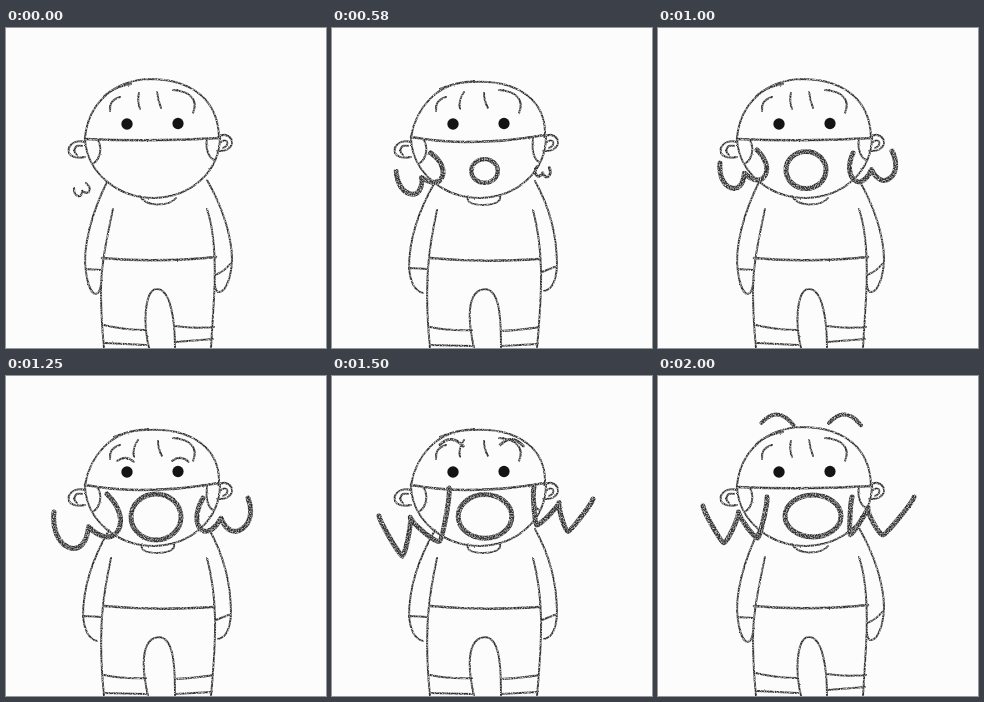
Recreate the animation shown at these times as an HTML page. Size 320 px wide and 320 px high, loop 10000 ms.

```html
<!DOCTYPE html>
<html lang="en">
<head>
<meta charset="utf-8">
<title>Wow</title>
<style>
html, body { margin: 0; width: 100%; height: 100%; overflow: hidden; background: #fcfcfc; }
svg { display: block; width: 100vw; height: 100vh; }
path, ellipse { fill: none; stroke: #303030; stroke-width: 2; stroke-linecap: round; stroke-linejoin: round; }
.bold { stroke-width: 2.5; }
.eye { fill: #141414; stroke: none; }
</style>
</head>
<body>
<svg viewBox="0 0 320 320">
  <defs>
    <filter id="pencil" filterUnits="userSpaceOnUse" x="0" y="0" width="320" height="320" color-interpolation-filters="sRGB">
      <feTurbulence type="fractalNoise" baseFrequency=".8" numOctaves="2" seed="4" result="noise"/>
      <feDisplacementMap in="SourceGraphic" in2="noise" scale="1.6" xChannelSelector="R" yChannelSelector="G" result="rough"/>
      <feColorMatrix in="noise" values="0 0 0 0 0  0 0 0 0 0  0 0 0 0 0  0 0 1.9 0 -.18" result="grain"/>
      <feComposite in="rough" in2="grain" operator="in"/>
    </filter>
  </defs>
  <g filter="url(#pencil)">
    <!-- parts common to both drawings -->
    <path d="M79 111C81 146 113 170 148 170C186 169 214 143 214 108"/>
    <path d="M79 114C68 111 61 118 63 125Q66 131 79 129M76 118C69 116 66 123 71 127"/>
    <path d="M212 109C219 104 227 109 226 116Q223 124 211 123M215 114C221 109 225 117 217 120"/>
    <path d="M91 111C97 119 94 131 88 135M104 83Q103 72 114 69M167 62C183 63 193 71 187 85"/>
    <g id="poseA">
      <path d="M79 110C82 76 108 51 146 51C186 52 212 72 213 109M98 68Q108 59 125 56"/>
      <path d="M201 111C199 121 203 131 209 132M133 65Q131 73 134 81M151 64Q152 72 155 80"/>
      <path d="M134 168C140 180 164 178 170 170"/>
      <path d="M101 154C86 184 76 220 80 244C82 258 86 266 90 266Q94 265 95 256M80 241L95 242"/>
      <path d="M201 152C216 178 226 208 226 232C225 254 218 265 212 264Q209 262 209 256M209 247Q219 243 224 236"/>
      <path d="M107 181C102 205 95 235 95 262Q95 290 98 320M201 181C209 205 210 235 208 270L205 320"/>
      <path d="M143 320C136 290 140 261 151 261C164 261 169 290 169 320"/>
      <path d="M98 297Q118 302 140 302M99 315L140 317M169 298Q188 301 208 299M169 314L207 311"/>
      <path class="bold" d="M79 111Q146 114 214 110M96 230Q150 235 210 229"/>
    </g>
    <g id="poseB">
      <path d="M79 109C84 80 105 54 140 54C190 51 214 76 213 107M108 61Q124 54 142 53"/>
      <path d="M201 111Q199 129 207 134M132 64Q126 72 128 81M152 65Q152 73 156 80"/>
      <path d="M136 168Q133 177 152 177Q170 176 168 168"/>
      <path d="M103 154C88 180 77 210 77 240Q79 262 91 265M78 240L96 241"/>
      <path d="M203 153C218 180 225 208 225 237Q224 261 212 263M210 244L225 238"/>
      <path d="M105 182C98 215 91 250 98 320M201 182C211 220 211 255 205 320"/>
      <path d="M142 320C134 285 137 262 153 261C168 262 169 290 169 320"/>
      <path d="M98 299Q118 303 140 302M98 317L140 318M169 303Q190 302 207 299M169 318L206 316"/>
      <path class="bold" d="M79 109Q138 120 213 107M98 230Q150 235 208 231"/>
    </g>
    <path id="left"/><ellipse id="ring"/><path id="right"/>
    <path id="browL"/><path id="browR"/>
  </g>
  <ellipse class="eye" cx="121" cy="96" rx="5.7" ry="5.8"/>
  <ellipse class="eye" cx="172" cy="95.5" rx="5.6" ry="5.8"/>
</svg>
<script>
const LOOP = 10000, FPS = 12, LAST = 20;
const $ = id => document.getElementById(id);
const clamp = v => Math.max(0, Math.min(1, v));
const mix = (a, b, t) => a + (b - a) * t;

// Key poses as [step, ...values], joined linearly.
function sample(keys, k) {
  const i = Math.max(1, keys.findIndex(e => e[0] >= k));
  const [a, b] = [keys[i - 1], keys[i]];
  return a.map((v, j) => mix(v, b[j], (k - a[0]) / (b[0] - a[0]))).slice(1);
}

// Each W hangs between its two tips: x0 y0 x1 y1, then sideways lean.
const leftTips = [
  [0, 68, 160, 80, 155, 0], [4, 60, 150, 87, 129, 0], [9, 67, 139, 106, 122, 0],
  [12, 62, 135, 99, 122, 0], [15, 48, 136, 101, 118, 0],
  [18, 47, 140, 117, 112, -.15], [20, 45, 130, 109, 121, 0]
];
const rightTips = [
  [6, 208, 141, 213, 141, 0], [9, 198, 134, 226, 137, 0], [12, 195, 125, 234, 123, -.05],
  [15, 197, 122, 242, 122, -.1], [18, 202, 111, 261, 123, -.07], [20, 194, 121, 256, 121, -.27]
];
// cx cy rx ry
const ringKeys = [
  [4, 150.5, 147.5, 1, 1], [9, 154, 140, 21.5, 19], [12, 148, 142, 20, 18.5],
  [15, 150, 141, 25, 23], [20, 155, 140, 28, 21]
];

// Half-ellipse from a to c through b; round 0 makes it a plain V.
function bowl(a, b, c, round) {
  const h = .55 * round;
  const u = [0, 1].map(i => (c[i] - a[i]) / 2 * h);
  const w = [0, 1].map(i => (b[i] - (a[i] + c[i]) / 2) * h);
  const add = (p, q, s = 1) => [p[0] + s * q[0], p[1] + s * q[1]];
  return `C${[add(a, w), add(b, u, -1), b, add(b, u), add(c, w), c].flat().map(v => v.toFixed(2)).join(' ')}`;
}

function letter([x0, y0, x1, y1, lean], sharp) {
  const dx = x1 - x0, dy = y1 - y0;
  const at = (a, b) => [x0 + a * dx - b * dy, y0 + a * dy + b * dx];
  const low = mix(.68, .61, sharp), round = mix(1.1, .3, sharp);
  const a = at(0, 0), e = at(1, 0);
  const b = at(mix(.04, .24, sharp) + lean, low);
  const c = at(mix(.5, .53, sharp) + lean, mix(.45, .17, sharp));
  const d = at(mix(.98, .77, sharp) + lean, low);
  return `M${a}` + bowl(a, b, c, round) + bowl(c, d, e, round);
}

function put(id, visible, attrs) {
  const el = $(id);
  el.style.display = visible ? '' : 'none';
  if (visible) for (const [name, v] of Object.entries(attrs())) {
    if (name === 'width') el.style.strokeWidth = v;
    else el.setAttribute(name, v);
  }
}

function brow(x, y, half, arch, width) {
  return { d: `M${x - half} ${y}Q${x} ${y - 2 * arch} ${x + half} ${y + arch / 4}`, width };
}

function render(step) {
  const k = Math.min(step, LAST);
  const first = (step >> 1) % 2 === 0;
  put('poseA', first, () => ({}));
  put('poseB', !first, () => ({}));

  const sharp = clamp((k - 15) / 3);
  const weight = age => mix(2.2, 5, clamp(age / 4));
  put('left', true, () => ({ d: letter(sample(leftTips, k), sharp), width: weight(k) }));
  put('right', k >= 6, () => ({ d: letter(sample(rightTips, k), sharp), width: weight(k - 6) }));
  put('ring', k >= 4, () => {
    const [cx, cy, rx, ry] = sample(ringKeys, k);
    return { cx, cy, rx, ry, width: weight(k - 4) };
  });

  // The brows speed up as they lift off the face.
  const rise = clamp((k - 14) / 6) ** 2;
  const y = mix(86, 47, rise), half = mix(8, 16, rise), arch = mix(3, 9, rise), w = mix(2, 4, rise);
  put('browL', k >= 14, () => brow(119.5, y, half, arch, w));
  put('browR', k >= 14, () => brow(mix(174, 187, rise), y, half, arch, w));
}

let start = null, shown = -1;
function tick(now) {
  if (start === null) start = now;
  const t = (now - start) % LOOP;
  const step = Math.min(24, Math.floor((t + 4) * FPS / 1000));
  if (step !== shown) render(shown = step);
  requestAnimationFrame(tick);
}
render(0);
requestAnimationFrame(tick);
</script>
</body>
</html>
```
